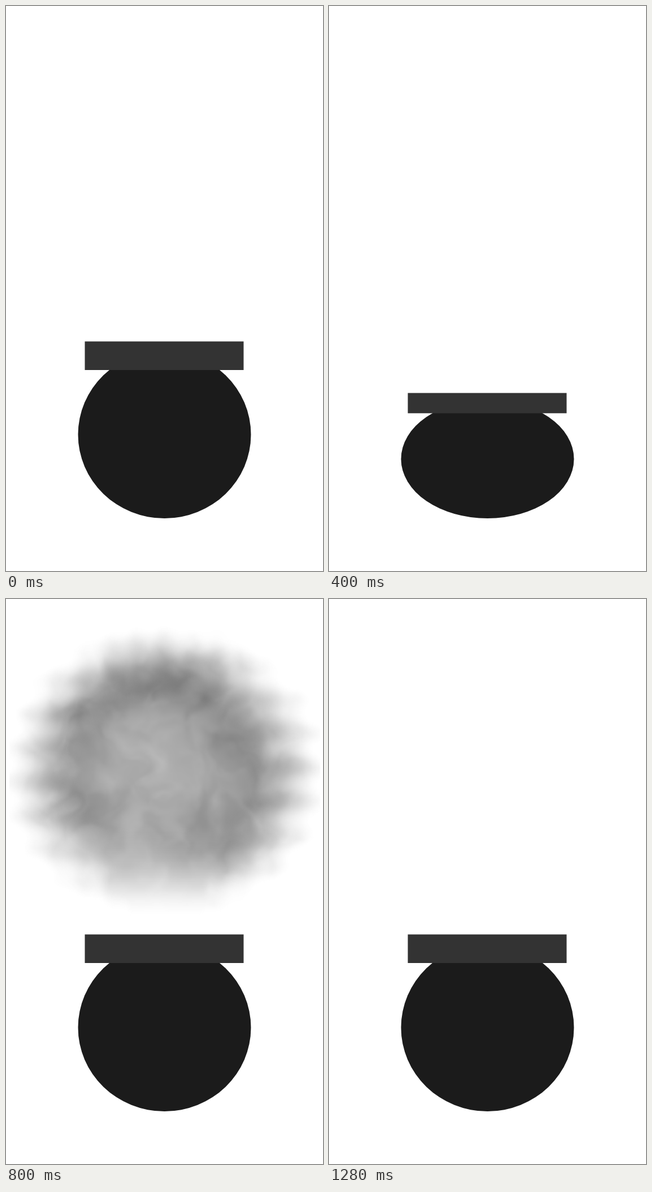
These frames come from a looping animation (561x998 px, 1440 ms). An HTML page with a canvas:

```html
<!DOCTYPE html>
<html>
<head>
<meta charset="utf-8">
<style>
  html, body { margin: 0; width: 100%; height: 100%; overflow: hidden; background: #fff; }
  canvas { display: block; }
</style>
</head>
<body>
<canvas id="stage" width="561" height="998"></canvas>
<script>
const LOOP = 1440, STEP = 80, LAST = 1280;
const CX = 280.5, FLOOR = 905;
const ctx = document.getElementById('stage').getContext('2d');

const clamp = (v, a = 0, b = 1) => Math.min(b, Math.max(a, v));
const smooth = v => { v = clamp(v); return v * v * (3 - 2 * v); };
const mix = (a, b, k) => a + (b - a) * k;

// Piecewise linear value through [time, value] pairs
function track(points, t) {
  const i = clamp(points.findIndex(p => p[0] > t), 1, points.length - 1);
  const [t0, a] = points[i - 1], [t1, b] = points[i];
  return mix(a, b, clamp((t - t0) / (t1 - t0)));
}

function hash(x, y) {
  const s = Math.sin(x * 127.1 + y * 311.7) * 43758.5453;
  return s - Math.floor(s);
}

function noise(x, y) {
  const ix = Math.floor(x), iy = Math.floor(y);
  const u = smooth(x - ix), v = smooth(y - iy);
  return mix(mix(hash(ix, iy), hash(ix + 1, iy), u),
             mix(hash(ix, iy + 1), hash(ix + 1, iy + 1), u), v);
}

const fbm = (x, y) =>
  noise(x, y) * 0.6 + noise(x * 2.1 + 7, y * 2.1) * 0.3 + noise(x * 4.3, y * 4.3 + 3) * 0.1;

// Smoke is computed at half resolution and scaled up
const W = 281, H = 360, PAD = 80;
const layer = document.createElement('canvas');
layer.width = W;
layer.height = H;
const layerCtx = layer.getContext('2d');
const pixels = layerCtx.createImageData(W, H);
const texture = new Float32Array(W * (H + PAD));
for (let y = 0, i = 0; y < H + PAD; y++) {
  for (let x = 0; x < W; x++, i++) {
    const u = x / 32, v = y / 32;
    const warpX = fbm(u + 11, v), warpY = fbm(u, v + 23);
    texture[i] = fbm(u + warpX * 1.5, v + warpY * 1.5) - 0.5;
  }
}

// Height below which the smoke thins out
const wipe = [[640, 592], [720, 450], [800, 401], [880, 386], [960, 344],
              [1040, 205], [1120, 14], [1200, -85], [1280, -200]];

function drawSmoke(t) {
  const left = Math.pow(1 - clamp((t - 480) / 320), 2.75);
  const rx = 285 - 145 * Math.sqrt(left), ry = 259 - 70 * Math.sqrt(left);
  const rise = 545 * left, cy = 47 + rise + ry;
  const shift = Math.min(PAD * 2, rise * 0.41);
  const line = track(wipe, t), stem = clamp(left / 0.149);
  const data = pixels.data;

  for (let j = 0, i = 0; j < H; j++) {
    const y = j * 2 + 1, dy = (y - cy) / ry;
    const row = (j + PAD - Math.round(shift / 2)) * W;
    const fade = 1 - smooth((y - line) / 165);
    const stemHalf = 125 + (592 - y) * 0.43;
    const stemDepth = stem * smooth(dy / 0.5);
    for (let k = 0; k < W; k++, i += 4) {
      const x = k * 2 + 1, dx = (x - CX) / rx, n = texture[row + k];
      const side = dx < 0 ? 262 : 235;
      const bumps = Math.cos((y - shift - side) * Math.PI / 31) * Math.abs(dx) * 0.04
                  + Math.cos((x - CX) * Math.PI / 24) * Math.abs(dy) * 0.012;
      const ball = 1.01 - Math.hypot(dx, dy) + bumps - n * 0.06;
      const column = stemDepth * Math.min(0.7, (stemHalf - Math.abs(x - CX)) / 160);
      const depth = Math.max(ball, column);
      const alpha = Math.min(smooth(depth / 0.5), fade);
      const tone = 165 - 32 * smooth((0.8 - depth) / 0.6) + 60 * n + 18 * clamp(dy, -1, 1);
      data[i] = data[i + 1] = data[i + 2] = tone;
      data[i + 3] = x > 6 && x < 556 ? 255 * alpha : 0;
    }
  }
  layerCtx.putImageData(pixels, 0, 0);
  ctx.drawImage(layer, 0, 0, W * 2, H * 2);
}

function drawBulb(t) {
  const squash = smooth(t / 272) - smooth((t - 382) / 178);
  ctx.save();
  ctx.translate(0, FLOOR);
  ctx.scale(1, 1 - 0.3 * squash);
  ctx.fillStyle = '#1b1b1b';
  ctx.beginPath();
  ctx.ellipse(CX, -148, 153, 148, 0, 0, Math.PI * 2);
  ctx.fill();
  ctx.fillStyle = '#333';
  ctx.fillRect(139.5, -312.5, 281, 50.5);
  ctx.restore();
}

function draw(t) {
  ctx.fillStyle = '#fff';
  ctx.fillRect(0, 0, 561, 998);
  if (t > 480 && t < LAST) drawSmoke(t);
  drawBulb(t);
}

let shown = -1;
function tick() {
  const time = performance.now() % LOOP;
  const t = Math.min(LAST, Math.floor(time / STEP) * STEP);
  if (t !== shown) draw(shown = t);
  requestAnimationFrame(tick);
}
tick();
</script>
</body>
</html>
```
